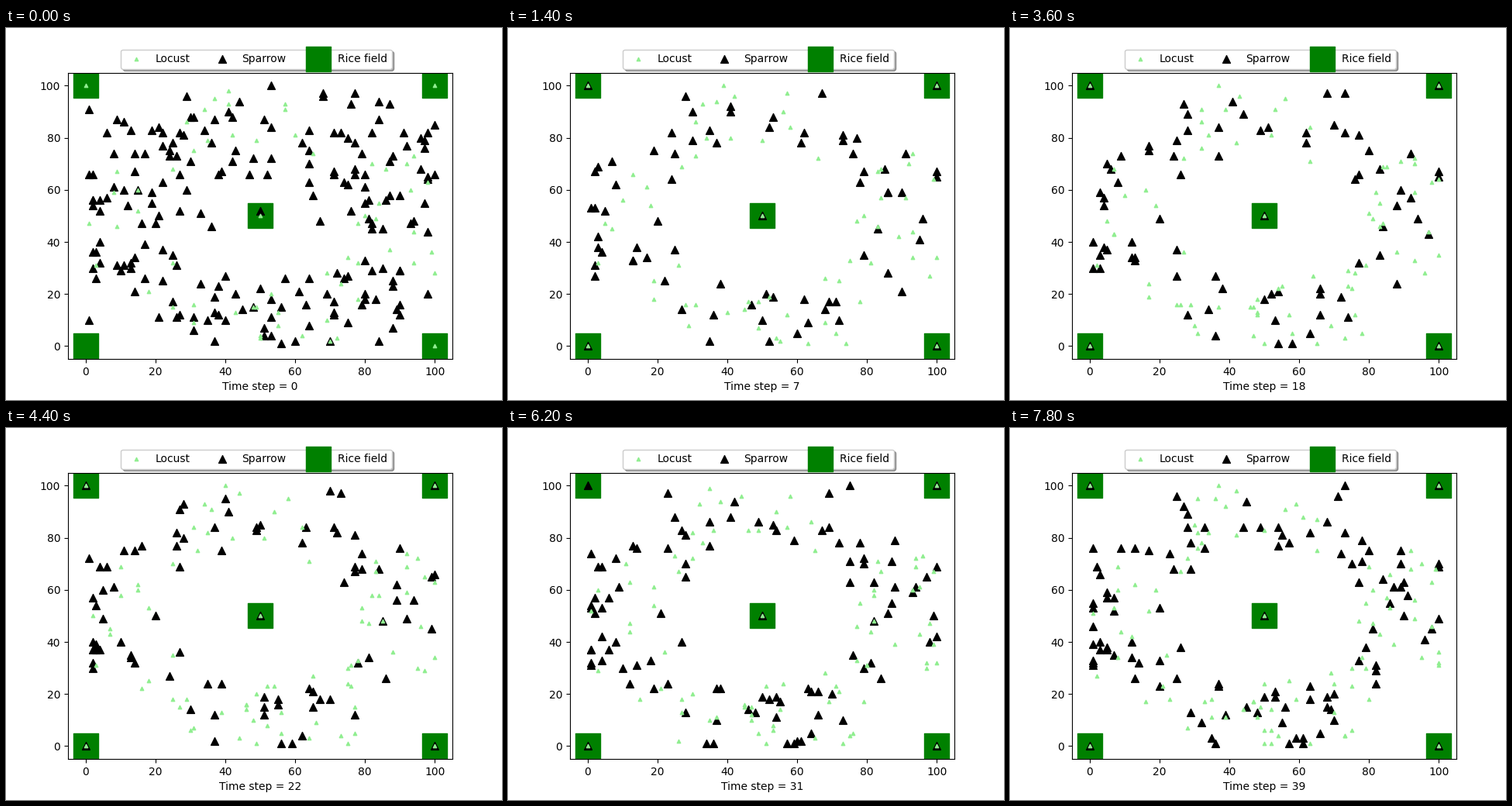
These frames come from a looping animation (640x480 px, 8000 ms). A matplotlib script:

```python
import numpy as np
import matplotlib.pyplot as plt
from matplotlib.animation import FuncAnimation

STEPS = 40
ARRIVAL = 6  # step at which each field has its own sparrow
rng = np.random.default_rng(11)

FIELDS = np.array([(0, 0), (0, 100), (50, 50), (100, 0), (100, 100)])
VISITORS = np.array([(1, 10), (1, 91), (50, 52), (90, 12), (87, 93)])


def habitat(n, clearance):
    """Random cells that keep a clearance from every field."""
    cells = rng.integers(1, 101, (40 * n, 2))
    gap = np.linalg.norm(cells[:, None] - FIELDS, axis=2).min(axis=1)
    return cells[gap > clearance][:n]


def wander(homes):
    """Random walk on whole cells, gently pulled back to each home."""
    offset = np.zeros(homes.shape)
    path = []
    for _ in range(STEPS):
        path.append(np.clip(np.rint(homes + offset), 1, 100))
        offset = 0.95 * offset + rng.normal(0, 0.8, homes.shape)
    return np.array(path)


def group(homes, born=(0, 1), dead=(STEPS, STEPS + 1)):
    n = len(homes)
    return wander(homes), rng.integers(*born, n), rng.integers(*dead, n)


def settlers(n, first_birth):
    """Lasting animals; every second one gets a descendant close by."""
    homes = habitat(n, 27)
    young = homes[::2] + rng.integers(-4, 5, homes[::2].shape)
    return [group(homes), group(young, born=(first_birth, STEPS))]


def living(groups, t):
    return np.vstack([path[t][(born <= t) & (t < dead)]
                      for path, born, dead in groups])


locusts = settlers(58, 4)
starving = group(habitat(122, 13), dead=(1, 8))
sparrows = settlers(70, 14) + [starving]
uneaten = rng.random((STEPS, len(FIELDS))) > 0.04


def visitors(t):
    part = min(t / ARRIVAL, 1)
    return np.rint(VISITORS + part * (FIELDS - VISITORS))


fig, ax = plt.subplots(figsize=(6.4, 4.8), dpi=100)
ax.set_xlim(-5, 105)
ax.set_ylim(-5, 105)


def markers(shape, color, size, label, z):
    return ax.scatter([], [], s=size, marker=shape, color=color,
                      label=label, zorder=z)


locust_dots = markers("^", "lightgreen", 10, "Locust", 1.3)
sparrow_dots = markers("^", "black", 50, "Sparrow", 1.2)
field_dots = markers("s", "green", 500, "Rice field", 1.1)
field_dots.set_offsets(FIELDS)
ax.legend(loc="upper center", bbox_to_anchor=(0.49, 1.1), ncol=3,
          fancybox=True, shadow=True)


def draw(t):
    locust_dots.set_offsets(np.vstack([living(locusts, t), FIELDS[uneaten[t]]]))
    sparrow_dots.set_offsets(np.vstack([living(sparrows, t), visitors(t)]))
    ax.set_xlabel(f"Time step = {t}")
    return locust_dots, sparrow_dots


anim = FuncAnimation(fig, draw, frames=STEPS, interval=200, repeat=True)
plt.show()
```
